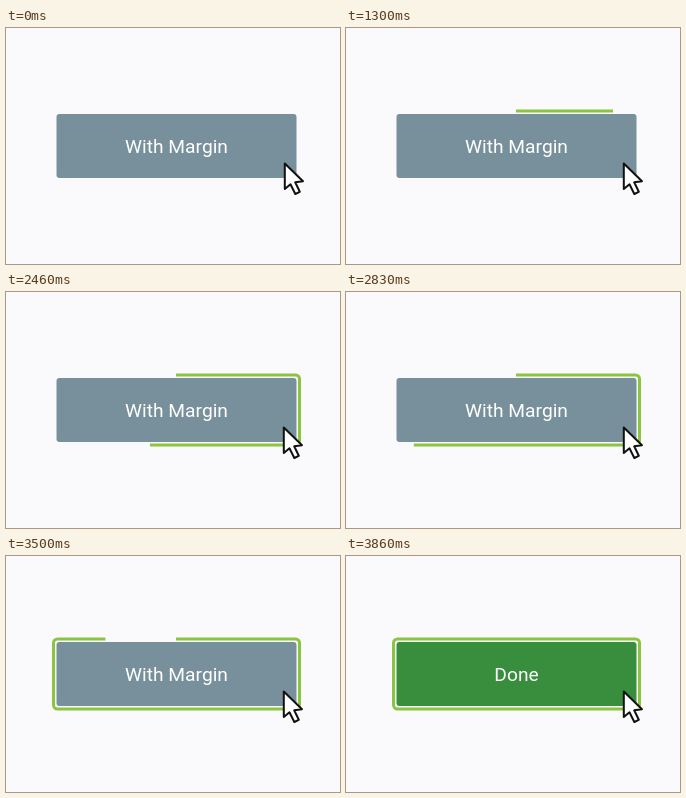
Recreate the animation shown at these times as an HTML page. Size 334 by 236 pixels, loop 4400 ms.

```html
<!DOCTYPE html>
<html lang="en">
<head>
<meta charset="utf-8">
<title>Hold button</title>
<style>
  html, body { margin: 0; width: 100%; height: 100%; overflow: hidden; background: #fafafc; }
  svg { display: block; width: 334px; height: 236px; }
  text { font: 400 19.2px Roboto, Arial, sans-serif; fill: #fff; text-anchor: middle; }

  .button, .ring, .idle, .done, .cursor { animation: 4.4s step-end infinite; }
  .button { fill: #78909c; animation-name: fill; }
  .idle { animation-name: hide; }
  .done { visibility: hidden; animation-name: show; }
  .cursor { animation-name: nudge; }

  /* The dash is slightly longer than the outline, so it closes fully on its last step. */
  .ring {
    fill: none; stroke: #8bc540; stroke-width: 3;
    stroke-dasharray: 630 640; stroke-dashoffset: 630;
    animation-name: trace;
  }

  @keyframes trace {
    0% { stroke-dashoffset: 630; }
    19.432% { stroke-dashoffset: 623; animation-timing-function: steps(90, end); }
    87.614%, 100% { stroke-dashoffset: 0; }
  }
  @keyframes fill { 0% { fill: #78909c; } 87.614%, 100% { fill: #388e3c; } }
  @keyframes hide { 0% { visibility: visible; } 87.614%, 100% { visibility: hidden; } }
  @keyframes show { 0% { visibility: hidden; } 87.614%, 100% { visibility: visible; } }
  @keyframes nudge { 0% { transform: translateX(1px); } 4.54%, 100% { transform: none; } }
</style>
</head>
<body>
<svg viewBox="0 0 334 236">
  <path class="ring" d="M170 83H289.5a4 4 0 0 1 4 4V149a4 4 0 0 1-4 4H51.5a4 4 0 0 1-4-4V87a4 4 0 0 1 4-4H170"/>
  <rect class="button" x="50.5" y="86" width="240" height="64" rx="3"/>
  <text class="idle" x="170.5" y="124.5">With Margin</text>
  <text class="done" x="170.5" y="124.5">Done</text>
  <path class="cursor" d="M277.8 135.5V161L283.5 156.3L288.3 166L292.8 163.8L288.2 154.3L296 153.2Z"
        fill="#fff" stroke="#111" stroke-width="2" stroke-linejoin="round"/>
</svg>
</body>
</html>
```
